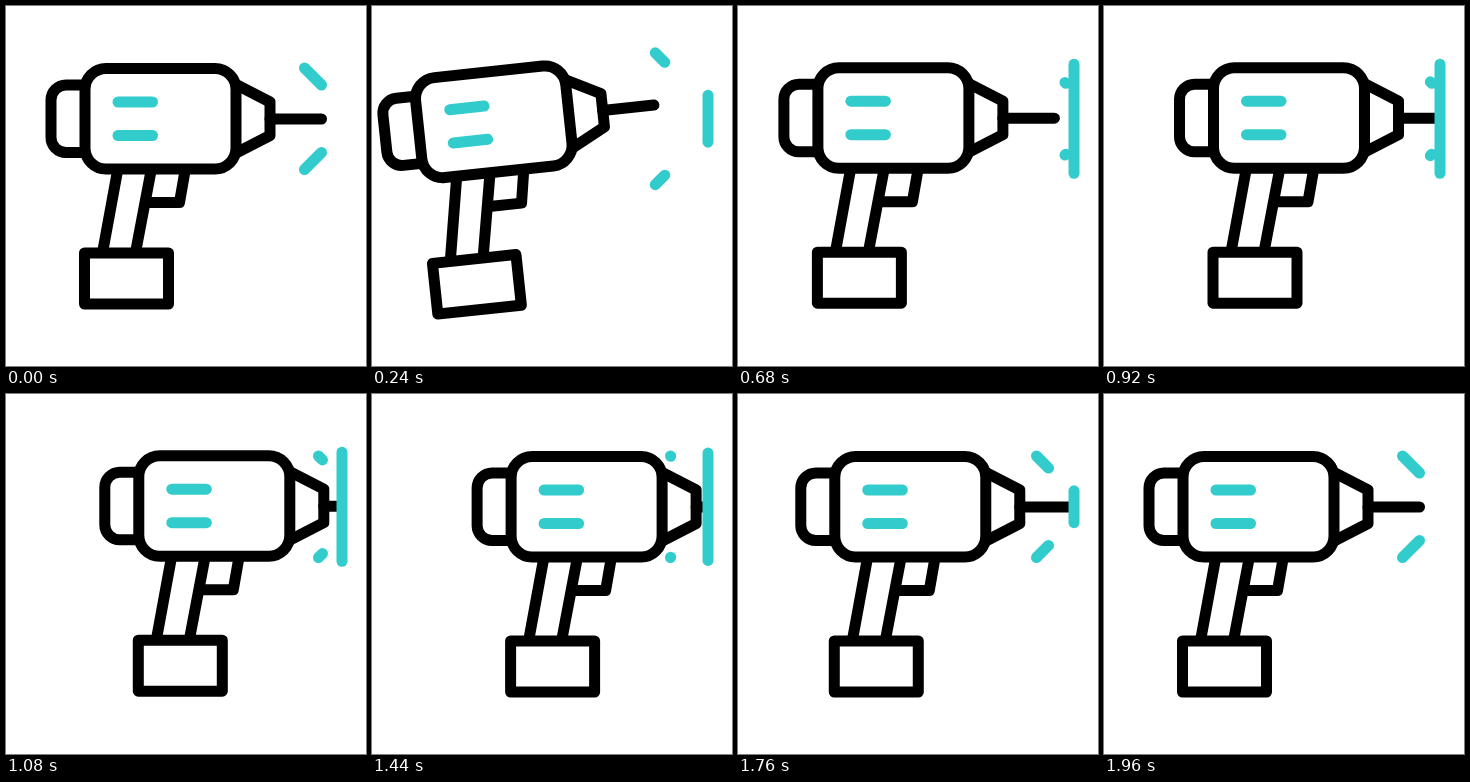
Animation, 360 px wide and 360 px high, one loop 2000 ms. Source, as an HTML page with a canvas:

```html
<!DOCTYPE html>
<html lang="en">
<head>
<meta charset="utf-8">
<title>Drill</title>
<style>
  html, body { margin: 0; width: 100%; height: 100%; overflow: hidden; background: #fff; }
  canvas { display: block; width: 100vw; height: 100vh; }
</style>
</head>
<body>
<canvas id="stage"></canvas>
<script>
const LOOP = 2000, SIZE = 360;
const INK = '#000', TEAL = '#33cccc';
const WALL_X = 336, MID_Y = 112.75;
const canvas = document.getElementById('stage');
const ctx = canvas.getContext('2d');

// Smooth 0..1 ramp between times a and b
function ease(t, a, b) {
  const p = Math.min(1, Math.max(0, (t - a) / (b - a)));
  return p * p * (3 - 2 * p);
}

function line(color, ...pts) {
  ctx.strokeStyle = color;
  ctx.beginPath();
  pts.forEach(([x, y], i) => i ? ctx.lineTo(x, y) : ctx.moveTo(x, y));
  ctx.stroke();
}

function box(x, y, w, h, r) {
  ctx.strokeStyle = INK;
  ctx.beginPath();
  ctx.roundRect(x, y, w, h, r);
  ctx.stroke();
}

function drawDrill() {
  // grip and trigger
  line(INK, [111.5, 165], [97, 244]);
  line(INK, [145, 165], [130, 244]);
  line(INK, [179, 165], [173.5, 196.5], [141, 196.5]);
  // battery
  box(78.5, 247, 84, 51, 0);
  // rear cap
  ctx.beginPath();
  ctx.moveTo(79, 79);
  ctx.arcTo(45, 79, 45, 112, 15);
  ctx.arcTo(45, 146.5, 79, 146.5, 15);
  ctx.lineTo(79, 146.5);
  ctx.stroke();
  // body, chuck, bit
  box(79, 62.5, 151, 100.5, 21);
  line(INK, [231, 79], [264, 96], [264, 129.5], [231, 146.5]);
  line(INK, [264, 113], [315.5, 113]);
  // vents
  line(TEAL, [112, 96], [146.5, 96]);
  line(TEAL, [112, 129.5], [146.5, 129.5]);
}

// Mirrored pair of sparks; from/to are fractions of a 17 px diagonal
function drawSparks(x, from, to) {
  if (to - from < 0.005) return;
  const len = 17, dy = MID_Y - 62;
  for (const s of [-1, 1]) {
    line(TEAL,
      [x + len * from, MID_Y + s * (dy - len * from)],
      [x + len * to, MID_Y + s * (dy - len * to)]);
  }
}

function drawScene(t) {
  const back = ease(t, 0, 320) - ease(t, 320, 640);
  const push = ease(t, 640, 1200) - ease(t, 1400, 1960);
  const lift = ease(t, 320, 640) - ease(t, 1180, 1240);

  ctx.fillStyle = '#fff';
  ctx.fillRect(0, 0, SIZE, SIZE);
  ctx.lineWidth = 11;
  ctx.lineCap = ctx.lineJoin = 'round';

  // the bit disappears into the wall
  ctx.save();
  ctx.beginPath();
  ctx.rect(0, 0, WALL_X, SIZE);
  ctx.clip();
  ctx.translate(180 - 30.5 * back + 61 * push, 180 - 0.8 * lift);
  ctx.rotate(-7.2 * back * Math.PI / 180);
  ctx.translate(-180, -180);
  drawDrill();
  ctx.restore();

  const half = 54.5 * (ease(t, 0, 530) - ease(t, 1400, 1960));
  if (half > 0.3) line(TEAL, [WALL_X, MID_Y - half], [WALL_X, MID_Y + half]);

  if (t < 640) {
    drawSparks(298.5, -1.06 * ease(t, 0, 320), 1 - 2.06 * ease(t, 0, 400));
  } else if (t < 1400) {
    drawSparks(312.5, 0.85 - 0.85 * ease(t, 900, 1060), 0.9 - 0.9 * ease(t, 940, 1150));
  } else {
    drawSparks(298.5, 0, ease(t, 1400, 1960));
  }
}

function resize() {
  const d = window.devicePixelRatio || 1;
  const w = Math.round(innerWidth * d), h = Math.round(innerHeight * d);
  if (canvas.width !== w || canvas.height !== h) {
    canvas.width = w;
    canvas.height = h;
  }
  ctx.setTransform(w / SIZE, 0, 0, h / SIZE, 0, 0);
}

let start = null;
function frame(now) {
  if (start === null) start = now;
  resize();
  drawScene(Math.max(0, now - start) % LOOP);
  requestAnimationFrame(frame);
}
requestAnimationFrame(frame);
</script>
</body>
</html>
```
